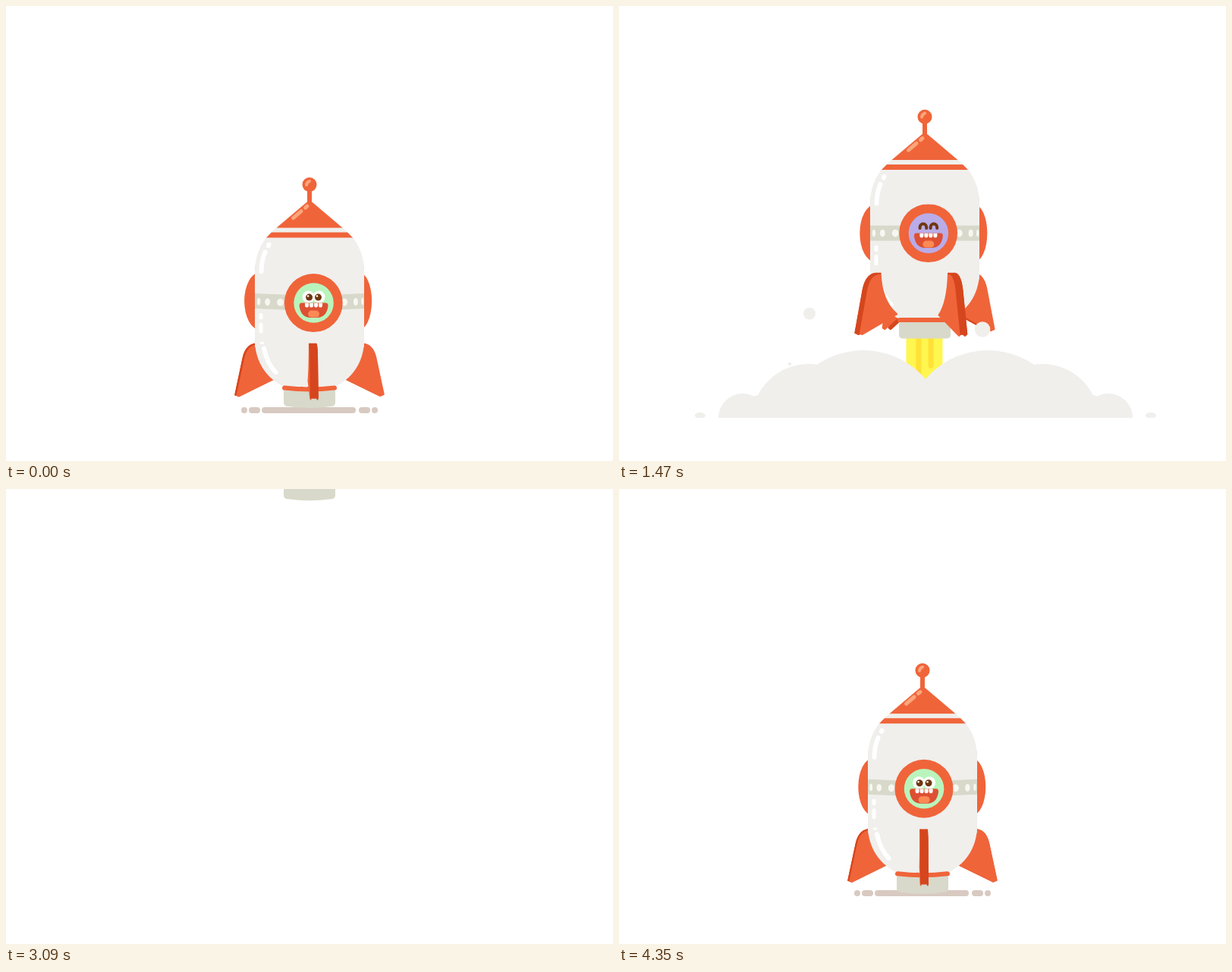
Write an HTML page with a canvas that moves like this. It is 800 by 600 pixels and loops after 4.38 s.

```html
<!DOCTYPE html>
<html>
<head>
<meta charset="utf-8">
<title>Rocket</title>
<style>
html, body { margin: 0; width: 100%; height: 100%; overflow: hidden; background: #fff; }
canvas { display: block; }
</style>
</head>
<body>
<canvas id="stage" width="800" height="600"></canvas>
<script>
const c = document.getElementById('stage').getContext('2d');
const LOOP = 4380, EMPTY = 2900, TAU = Math.PI * 2, RAD = Math.PI / 180;
const ORANGE = '#f0643a', DARK = '#d6461e', SHELL = '#f0efec', GREY = '#d8d9ca',
  GROUND = '#d8cac1', FLAME = '#fff64f', STREAK = '#ffe137', SHINE = '#fba57a', BROWN = '#6e3810';
const GLASS = ['#b9f4bc', '#b9ace8', '#b9ace8', '#fff247'];

const span = (t, a, b) => Math.min(1, Math.max(0, (t - a) / (b - a)));
const ramp = (t, a, b) => { const u = span(t, a, b); return u * u * (3 - 2 * u); };
const mix = (a, b, u) => a + (b - a) * u;

// Motion rules
function lift(t) {
  const dip = 6 * Math.sin(Math.PI * span(t, 0, 220));
  const climb = -152 * ramp(t, 130, 690), sink = 62 * ramp(t, 700, 1550);
  return dip + climb + sink - 132 * (Math.max(0, t - 1600) / 650) ** 3.4;
}
function hop(t) {
  const u = span(t, 4130, LOOP);
  return -Math.sin(TAU * u) * (18 - 14 * u);
}
function rumble(t) {
  return 3 * Math.sin(TAU * (t - 930) / 103) * span(t, 300, 500) * (1 - span(t, 2400, 2650));
}
const spinUp = (t, slip, rate, gain) => 3.5 + slip * ramp(t, 0, 300) + rate * t + gain * t * t;
function spinDown(t) {
  const left = LOOP - t;
  return 363.5 - 0.07 * left - 7e-5 * left * left;
}
function drop(t, start, land, from) {
  const u = (t - start) / (land - start);
  if (u < 0) return -900;
  return u < 1 ? from * (1 - u * u) : -14 * Math.sin(Math.PI * span(t, land, land + 200));
}

// Drawing helpers
function fill(color, path) {
  c.fillStyle = color;
  c.fill(new Path2D(path));
}
function line(color, width, path) {
  c.strokeStyle = color;
  c.lineWidth = width;
  c.lineCap = c.lineJoin = 'round';
  c.stroke(new Path2D(path));
}
function oval(color, x, y, rx, ry = rx) {
  if (rx <= 0 || ry <= 0) return;
  c.fillStyle = color;
  c.beginPath();
  c.ellipse(x, y, rx, ry, 0, 0, TAU);
  c.fill();
}
function box(color, x, y, w, h, r) {
  if (w <= 0 || h <= 0) return;
  c.fillStyle = color;
  c.beginPath();
  c.roundRect(x, y, w, h, r);
  c.fill();
}
function shifted(x, y, draw) {
  c.save();
  c.translate(x, y);
  draw();
  c.restore();
}

function ground(t) {
  const half = t < EMPTY ? 92 * (1 - ramp(t, 2400, 2680))
    : 64 * ramp(t, 3290, 3485) + 28 * span(t, 3480, 3680);
  c.save();
  c.beginPath();
  c.rect(399.5 - half, 520, half * 2, 30);
  c.clip();
  box(GROUND, 337, 529, 124, 8, 4);
  for (const s of [-1, 1]) {
    box(GROUND, 400 + s * 72.5 - 7.5, 529, 15, 8, 4);
    oval(GROUND, 400 + s * 86, 533, 4);
  }
  c.restore();
}

function flame(t, dy) {
  const top = 530 + dy, size = Math.min(220, 528 - top) * span(t, 120, 220);
  if (size <= 0) return;
  c.save();
  c.beginPath();
  c.roundRect(375.5, top - 12, 48, size + 12, [0, 0, 24, 24]);
  c.clip();
  c.fillStyle = FLAME;
  c.fillRect(370, top - 12, 60, size + 20);
  const gap = 121, phase = (14 + 0.3645 * (t - 930)) % gap;
  for (const [x, lag] of [[404.5, 0], [388.5, 16]])
    for (let k = -2; k < 3; k++) {
      const y = phase + lag + k * gap;
      box(STREAK, x, top + y, 7, Math.min(68, 158 - y), 3.5);
    }
  c.restore();
}

// A flat fin with a thick outer edge, turned about the rocket's axis
function fin(angle, grow) {
  const s = Math.sin(angle * RAD), k = Math.cos(angle * RAD);
  const near = -Math.sign(s) * 4.5 * k;
  const at = (x, y, off) => {
    const px = mix(58, x, grow), py = mix(470, y, grow);
    return `${px * s + 400 + off} ${py + 5 * k * span(py, 440, 520)} `;
  };
  const outer = o => `${at(70, 442, o)}Q${at(86, 442, o)}${at(91, 462, o)}L${at(103, 518, o)}`;
  const back = o => `L${at(103, 518, o)}${at(91, 462, o)}Q${at(86, 442, o)}${at(70, 442, o)}Z`;
  const side = o => `M${outer(o)}L${at(98, 520, o)}${at(45, 494, o)}Q${at(68, 478, o)}${at(70, 442, o)}Z`;
  const paint = (color, path) => {
    fill(color, path);
    line(color, 2, path);
  };
  paint(DARK, side(-near));
  paint(ORANGE, side(near));
  if (k > 0) paint(DARK, 'M' + outer(-near) + back(near));
}
function fins(base, grow, front) {
  if (grow <= 0) return;
  for (let i = 0; i < 4; i++) {
    const a = base + i * 90;
    if ((Math.cos(a * RAD) > 0.3) === front) fin(a, grow);
  }
}

function face(happy) {
  for (const x of [-7, 7]) {
    if (happy) {
      line(BROWN, 4, `M${x - 4.3} -6.5V-8A4.3 4.3 0 0 1 ${x + 4.3} -8V-6.5`);
    } else {
      oval('#fff', x, -8, 8);
      oval(BROWN, x * 0.85, -7.5, 4.5);
      oval('#fff', x * 0.85 - 1.5, -9, 1.3);
    }
  }
  c.save();
  const mouth = new Path2D('M-16 0H16Q19 0 19 4Q17 19.5 4 19.5H-4Q-17 19.5 -19 4Q-19 0 -16 0Z');
  c.fillStyle = '#dd5033';
  c.fill(mouth);
  c.clip(mouth);
  box('#fb8a55', -7.5, 10, 15, 9, 4.5);
  for (let i = 0; i < 4; i++) box('#fff', -11.5 + i * 6, 0, 5, 6, [0, 0, 2.5, 2.5]);
  c.restore();
}

function ports(spin, tilt, happy, back) {
  for (let i = 0; i < 4; i++) {
    const a = ((spin - 90 * i + 180) % 360 + 360) % 360 - 180;
    const turn = Math.abs(a), side = Math.sign(a);
    if (back !== turn > 84) continue;
    if (back) {
      oval(ORANGE, 400 + side * 65, 389, 64 - turn / 2, 38);
      continue;
    }
    const x = 400 + side * Math.min(77, 80 * Math.sin(turn * RAD));
    const y = 389 + 2.5 * tilt * Math.cos(turn * RAD);
    const w = 7 + 31.5 * Math.max(0, 1 - (turn / 60) ** 2) ** 0.6;
    oval(ORANGE, x, y, w, 38.5);
    if (turn < 56) shifted(x + a * 0.07, y, () => {
      c.scale(w / 38.5, 1);
      oval(GLASS[i], 0, 0, 26.3);
      face(happy);
    });
  }
}

function cup(tilt) {
  const low = 528 + 4 * tilt;
  fill(GREY, `M366 503H434V523Q434 528 428 528Q400 ${low} 372 528Q366 528 366 523Z`);
  box(GREY, 328, 430, 144, 20, [8, 8, 0, 0]);
  fill(SHELL, 'M328 440C328 472 346 492 366 502H434C454 492 472 472 472 440Z');
  line(ORANGE, 6, `M367 503.5Q400 ${503.5 + 4 * tilt} 433 503.5`);
  line('#fff', 6, 'M337.5 442V443M340 451.5Q344 471 355.5 483');
}

function middle(spin, tilt, happy) {
  ports(spin, tilt, happy, true);
  box(GREY, 328, 337, 144, 20, [8, 8, 0, 0]);
  c.fillStyle = SHELL;
  c.fillRect(328, 350, 144, 93);
  const bow = 389 + 4 * tilt;
  fill(GREY, `M328 379Q400 ${bow - 10} 472 379V399Q400 ${bow + 10} 328 399Z`);
  for (let d = 0; d < 20; d++) {
    const a = (spin + d * 18) * RAD, k = Math.cos(a);
    if (k > 0.12) oval('#f7f7f2', 400 + 72 * Math.sin(a), 389 + 2 * tilt * k, 4.8 * k + 0.4, 4.8);
  }
  line('#fff', 5, 'M336 407.5V411M336 420V429');
  ports(spin, tilt, happy, false);
}

function nose() {
  c.fillStyle = ORANGE;
  c.fillRect(397, 240, 6, 22);
  oval(ORANGE, 400, 235.5, 9.5);
  line(SHINE, 4, 'M396 236Q396.5 232 400 231');
  fill(SHELL, 'M357 292C338 306 328 326 328 351H472C472 326 462 306 443 292Z');
  fill(ORANGE, 'M396 259Q400 255.5 404 259L443.5 292.5H356.5Z');
  fill(ORANGE, 'M350 298.5H450L457 305.5H343Z');
  line(SHINE, 5, 'M378.5 279.5L389 270.5M394.5 266L397 263.8');
  line('#fff', 6, 'M346.5 314.5L346 316M341.5 324.5Q337 334 336.5 350');
}

// Puffs on one side of the cloud: distance out, depth below the floor, radius
const PUFFS = [[241, 0, 32], [217, 0, 30], [154, 4, 75], [82, 19, 108]];
const FLOOR = 541;

function cloud(t) {
  const size = Math.sin(Math.PI / 2 * span(t, 220, 900)) * (1 - ramp(t, 2280, 2670));
  const swell = 1 - ramp(t, 930, 1470), part = ramp(t, 1600, 2250);
  const far = span(t, 950, 1080), speck = far * (1 - span(t, 2450, 2650));
  c.save();
  c.beginPath();
  c.rect(0, 0, 800, FLOOR);
  c.clip();
  for (const side of [-1, 1]) {
    for (const [x, depth, r] of PUFFS) {
      const big = r > 60, sag = r > 100 ? 13 * swell : 0, gone = big ? part : 0;
      const px = mix(x * (1 + 0.06 * swell), 137, gone);
      const py = mix(depth + sag, 0, gone), pr = mix(r + sag, 77, gone);
      oval(SHELL, 401 + side * px * size, FLOOR + py * size, pr * size);
    }
    oval(SHELL, 401 + side * (270 + 27 * far), 538, 7 * speck, 4 * speck);
  }
  c.restore();
}

function bubbles(t) {
  [248, 476, 222, 323, 263].forEach((x, i) => {
    const age = t - 780 - 330 * i;
    if (age < 0 || age > 1000) return;
    const r = 11 * Math.sqrt(1 - (age / 1000) ** 2) * span(age, 0, 150) * (1 - span(t, 2400, 2660));
    const y = 448 + 0.14 * Math.abs(x - 400) - 0.095 * age;
    oval(SHELL, x, y, r);
    // Neck while the bubble leaves the cloud
    if (age < 220) fill(SHELL, `M${x - 15} ${y + 19}Q${x - 3} ${y + 14} ${x - 6} ${y + 8}H${x + 6}Q${x + 3} ${y + 14} ${x + 15} ${y + 19}Z`);
  });
}

function rocket(t, dy) {
  const flying = t < EMPTY;
  const tilt = flying ? 1 - span(t, 0, 300) : 1;
  const spin = flying ? spinUp(t, 7.4, 0.2845, 1.106e-5) : spinDown(t);
  const finSpin = flying ? spinUp(t, -17.1, 0.164, 3.34e-5) : spinDown(t);
  const grow = flying ? 1 - 0.12 * tilt : 0.88 * ramp(t, 4070, 4240);
  const happy = t > 200 && t < 4080;
  const fall = (start, land, from) => flying ? 0 : drop(t, start, land, from);
  shifted(0, dy, () => {
    fins(finSpin, grow, false);
    shifted(0, fall(3030, 3390, -530), () => cup(tilt));
    shifted(0, fall(3240, 3558, -480), () => middle(spin, tilt, happy));
    shifted(0, fall(3560, 3880, -370), nose);
    fins(finSpin, grow, true);
  });
}

function draw(t) {
  c.fillStyle = '#fff';
  c.fillRect(0, 0, 800, 600);
  const flying = t < EMPTY, shake = flying ? rumble(t) : 0;
  shifted(shake, Math.abs(shake) * 0.7, () => {
    const dy = flying ? lift(t) : hop(t);
    ground(t);
    if (flying) flame(t, dy);
    rocket(t, dy);
    if (flying) {
      cloud(t);
      bubbles(t);
    }
  });
}

const start = performance.now();
function tick() {
  draw((performance.now() - start) % LOOP);
  requestAnimationFrame(tick);
}
tick();
</script>
</body>
</html>
```
